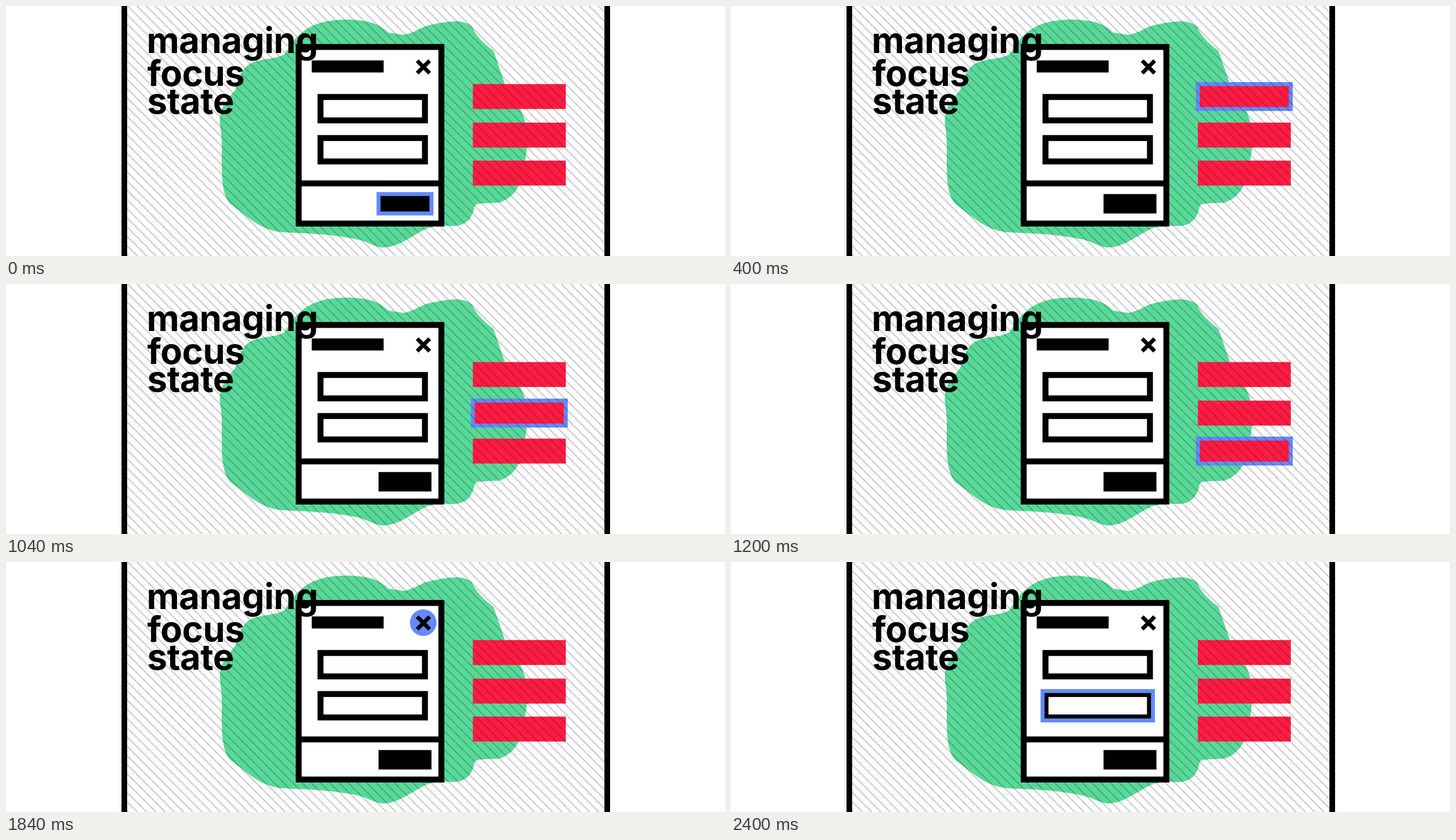
Recreate the animation shown at these times as an HTML page with a canvas. Size 1270 by 441 pixels, loop 2.8 s.

```html
<!DOCTYPE html>
<html lang="en">
<head>
<meta charset="utf-8">
<title>Managing focus state</title>
<style>
  html, body { margin: 0; width: 100%; height: 100%; overflow: hidden; background: #fff; }
  canvas { display: block; }
</style>
</head>
<body>
<canvas id="stage" width="1270" height="441"></canvas>
<script>
const ctx = document.getElementById('stage').getContext('2d');
const STEP = 400;
const HATCH_GAP = 16.3;
const BLUE = '#628aff', GREEN = '#58d998', RED = '#ff1c43';
const FOCUS_ORDER = ['button', 'bar0', 'bar1', 'bar2', 'close', 'field0', 'field1'];
const BARS = [137.7, 205.7, 272.7];
const FIELDS = [155.3, 227.7];

const blob = new Path2D(`M600 24 C642 24 662 33 675 47 Q690 49 702 51
  C716 49 728 41 740 36 C765 29 785 27 797 27 Q814 28 823 36
  Q831 57 861 79 Q871 108 881 137 C890 165 902 168 909 183
  C917 199 921 215 921 240 C920 265 914 285 908 312
  C900 330 889 341 871 347 Q852 347 833 349
  Q826 352 827 358 C821 378 811 389 785 388 Q762 386 742 393
  C710 409 693 426 665 426 C651 425 642 417 622 412
  C570 401 520 401 487 399 C448 395 425 370 397 350
  C381 334 381 300 381 265 Q382 235 379 216 C373 181 390 167 405 148
  C414 122 418 105 440 98 C460 92 480 93 492 85 C508 61 526 24 600 24 Z`);

function fillRect(color, x, y, w, h) {
  ctx.fillStyle = color;
  ctx.fillRect(x, y, w, h);
}

function strokeRect(color, width, x, y, w, h) {
  ctx.strokeStyle = color;
  ctx.lineWidth = width;
  ctx.strokeRect(x, y, w, h);
}

const focusRing = (x, y, w, h) => strokeRect(BLUE, 7, x, y, w, h);

function drawHatch() {
  ctx.save();
  ctx.beginPath();
  ctx.rect(214, 0, 843, 441);
  ctx.clip();
  ctx.beginPath();
  for (let x = 704 - 60 * HATCH_GAP; x < 1060; x += HATCH_GAP) {
    ctx.moveTo(x - 2, -2);
    ctx.lineTo(x + 443, 443);
  }
  ctx.strokeStyle = 'rgba(0, 0, 0, 0.22)';
  ctx.lineWidth = 2;
  ctx.stroke();
  ctx.restore();
}

function drawCross(x, y, r) {
  ctx.beginPath();
  ctx.moveTo(x - r, y - r);
  ctx.lineTo(x + r, y + r);
  ctx.moveTo(x + r, y - r);
  ctx.lineTo(x - r, y + r);
  ctx.strokeStyle = '#000';
  ctx.lineWidth = 7;
  ctx.stroke();
}

function drawCard(focus) {
  fillRect('#fff', 512, 67, 262, 322);
  strokeRect('#000', 10.5, 517, 72.25, 252, 311.5);
  fillRect('#000', 517, 307.7, 252, 10.5);
  fillRect('#000', 540, 96, 127, 21.3);

  if (focus === 'close') {
    ctx.fillStyle = BLUE;
    ctx.beginPath();
    ctx.arc(737, 107, 23.5, 0, Math.PI * 2);
    ctx.fill();
  }
  drawCross(737.3, 107.5, 11);

  FIELDS.forEach((y, i) => {
    strokeRect('#000', 10.5, 555.5, y + 5.2, 184.5, 41.3);
    if (focus === 'field' + i) focusRing(550.3, y, 195, 51.8);
  });

  fillRect('#000', 658, 331.7, 93.5, 34.3);
  if (focus === 'button') focusRing(658, 331.7, 93.5, 34.3);
}

function drawTitle() {
  ctx.fillStyle = '#000';
  ctx.font = '700 63px Inter, sans-serif';
  ctx.letterSpacing = '-0.4px';
  ctx.fillText('managing', 248.5, 82.5);
  ctx.fillText('focus', 249.5, 140.5);
  ctx.fillText('state', 249.5, 190);
}

function draw(focus) {
  fillRect('#fff', 0, 0, 1270, 441);
  ctx.fillStyle = GREEN;
  ctx.fill(blob);
  BARS.forEach((y, i) => {
    fillRect(RED, 824.6, y, 164.2, 44);
    if (focus === 'bar' + i) focusRing(824.6, y, 164.2, 44);
  });
  drawHatch();
  fillRect('#000', 204, 0, 10, 441);
  fillRect('#000', 1057, 0, 10, 441);
  drawCard(focus);
  drawTitle();
}

function tick() {
  const step = Math.floor(performance.now() / STEP) % FOCUS_ORDER.length;
  draw(FOCUS_ORDER[step]);
  requestAnimationFrame(tick);
}
tick();
</script>
</body>
</html>
```
